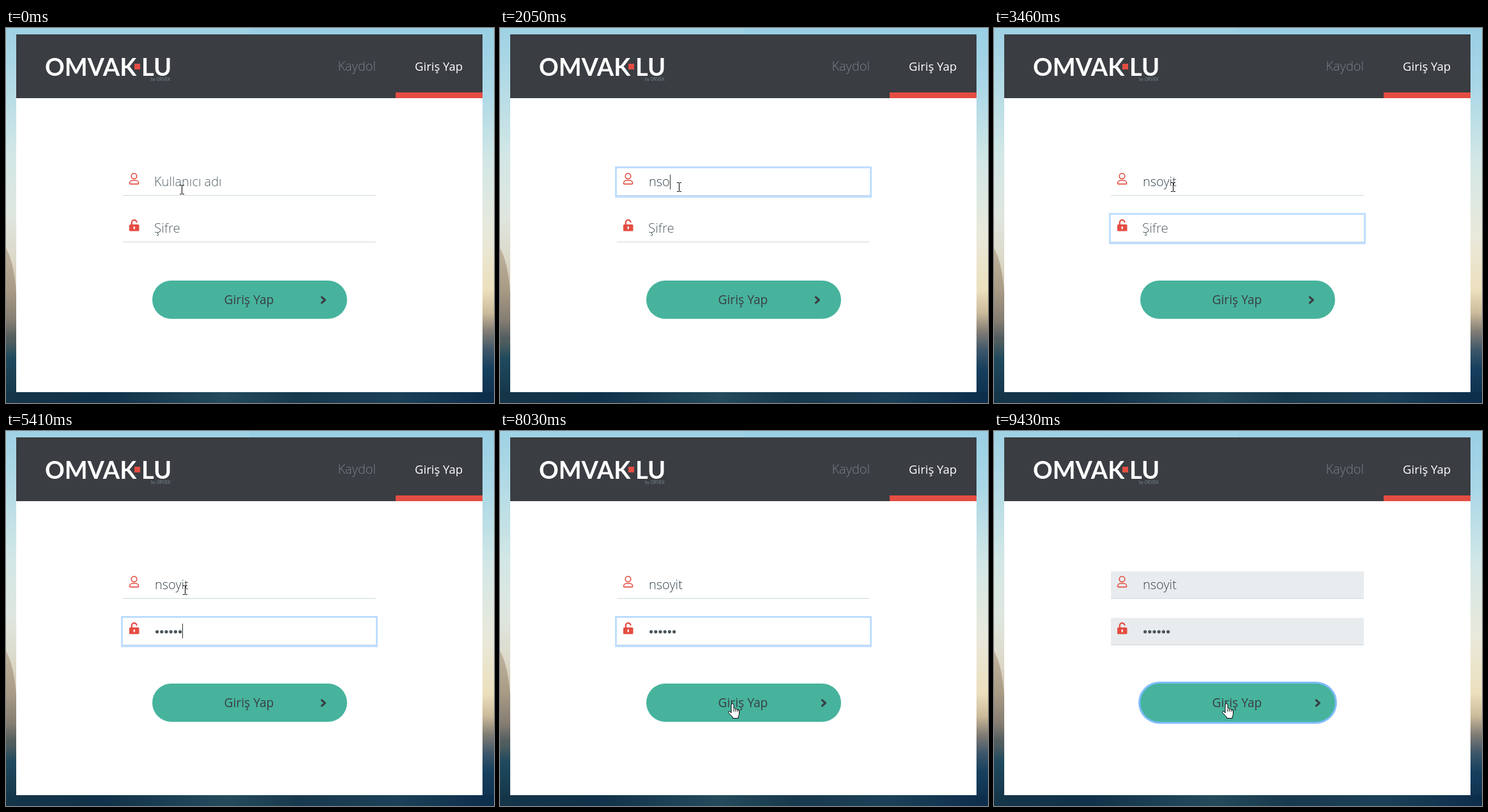
These frames come from a looping animation (764 by 588 pixels, 9510 ms). An HTML page with a canvas:

```html
<!DOCTYPE html>
<html lang="tr">
<head>
<meta charset="utf-8">
<style>
  html, body { margin: 0; width: 100%; height: 100%; overflow: hidden; }
  canvas { display: block; width: 764px; height: 588px; }
</style>
</head>
<body>
<canvas id="stage" width="764" height="588"></canvas>
<script>
const ctx = document.getElementById('stage').getContext('2d');
const LOOP = 9510;
const INK = '#3a3d42', RED = '#e44d42', TEAL = '#47b39d';
const SANS = '"Open Sans", "Noto Sans", sans-serif';
const USER = 'nsoyit';
const FIELD = { x: 183, w: 396, h: 43, textX: 233 };
const userTop = 220, passTop = 293;

const clamp = v => Math.max(0, Math.min(1, v));
const smooth = v => { v = clamp(v); return v * v * (3 - 2 * v); };
const countPassed = (times, t) => times.filter(time => t >= time).length;

// Value of the last [time, value] pair already reached.
function at(t, steps) {
  let value = steps[0][1];
  for (const [time, v] of steps) if (t >= time) value = v;
  return value;
}

function rect(x, y, w, h, fill) {
  ctx.fillStyle = fill;
  ctx.fillRect(x, y, w, h);
}

function pill(x, y, w, h, r, fill) {
  ctx.beginPath();
  ctx.roundRect(x, y, w, h, r);
  ctx.fillStyle = fill;
  ctx.fill();
}

function disc(x, y, r, fill) {
  ctx.beginPath();
  ctx.arc(x, y, r, 0, Math.PI * 2);
  ctx.fillStyle = fill;
  ctx.fill();
}

function text(str, x, y, size, weight, fill, family = SANS) {
  ctx.font = `${weight} ${size}px ${family}`;
  ctx.fillStyle = fill;
  ctx.fillText(str, x, y);
  return ctx.measureText(str).width;
}

function gradient(x1, y1, stops) {
  const g = ctx.createLinearGradient(0, 0, x1, y1);
  for (const [pos, color] of stops) g.addColorStop(pos, color);
  return g;
}

function drawBackdrop() {
  rect(0, 0, 382, 588, gradient(0, 588, [
    [0, '#9ed1e4'], [.15, '#b3dbe6'], [.34, '#d2e7e6'], [.5, '#dfe6df'],
    [.62, '#dcd8c8'], [.71, '#c9bda6'], [.78, '#978d7f'], [.83, '#56605f'],
    [.88, '#204a5e'], [1, '#123246']]));
  ctx.beginPath();
  ctx.moveTo(0, 345);
  ctx.quadraticCurveTo(12, 365, 16, 415);
  ctx.lineTo(16, 490);
  ctx.lineTo(0, 490);
  ctx.fillStyle = gradient(0, 588, [
    [.58, '#c2b59f'], [.7, '#a89a85'], [.78, '#857d72'], [.83, '#4f5b5d']]);
  ctx.fill();
  rect(382, 0, 382, 588, gradient(0, 588, [
    [0, '#99cfe4'], [.15, '#a9d7e7'], [.36, '#d3e7e6'], [.55, '#e9e9db'],
    [.7, '#ecdfbd'], [.76, '#cbbb9b'], [.81, '#807b74'], [.86, '#3c566a'],
    [.91, '#163f5e'], [1, '#0c2d4b']]));
  rect(0, 571, 764, 17, gradient(764, 0, [
    [0, '#153549'], [.2, '#10324a'], [.45, '#254a5c'], [.6, '#17394d'],
    [.8, '#1c4058'], [1, '#0c2d4b']]));
}

function drawHeader() {
  rect(16, 10, 730, 100, INK);
  text('OMVAK', 61, 75, 38, 700, '#fff', 'Lato, sans-serif');
  rect(201, 56, 9, 9, RED);
  text('LU', 212, 75, 38, 700, '#fff', 'Lato, sans-serif');
  text('by ORVEK', 227, 83, 6.5, 700, '#66757b', 'Lato, sans-serif');
  text('Kaydol', 519.5, 67, 20, 300, '#76828a');
  text('Giriş Yap', 640, 67, 18.5, 400, '#fff');
  rect(610, 101, 136, 9, RED);
}

function drawUserIcon() {
  ctx.strokeStyle = RED;
  ctx.lineWidth = 1.6;
  ctx.beginPath();
  ctx.arc(200.5, 232.3, 4.3, 0, Math.PI * 2);
  ctx.stroke();
  ctx.beginPath();
  ctx.roundRect(193.6, 239, 14, 5.6, [4.5, 4.5, 1.2, 1.2]);
  ctx.stroke();
}

function drawLockIcon() {
  pill(193, 308, 15.5, 10.5, 1.6, RED);
  ctx.strokeStyle = RED;
  ctx.lineWidth = 2.3;
  ctx.beginPath();
  ctx.moveTo(196.8, 309);
  ctx.lineTo(196.8, 305);
  ctx.arc(200.7, 305, 3.9, Math.PI, Math.PI * 2);
  ctx.stroke();
  pill(199.6, 311, 2.2, 4.6, 1, '#fff');
}

function drawField(top, focus, disabled) {
  const { x, w, h } = FIELD;
  if (focus) {
    const s = 3 * focus;
    rect(x - s, top - s, w + 2 * s, h + 2 * s, `rgba(0,123,255,${.25 * focus})`);
  }
  rect(x, top, w, h, disabled ? '#e9ecef' : '#fff');
  rect(x, top + h - 1, w, 1, focus ? '#c3d6e8' : '#ced9e1');
}

function drawCaret(x, top) {
  rect(Math.round(x), top, 1, 23, '#333');
}

function drawButton(focus, chevronShift) {
  if (focus) {
    const s = 3 * focus;
    pill(229 - s, 396 - s, 305 + 2 * s, 60 + 2 * s, 30 + s, `rgba(0,123,255,${.5 * focus})`);
  }
  pill(229, 396, 305, 60, 30, TEAL);
  text('Giriş Yap', 341.5, 433, 19.2, 400, INK);
  ctx.strokeStyle = INK;
  ctx.lineWidth = 3;
  ctx.lineCap = ctx.lineJoin = 'round';
  ctx.beginPath();
  ctx.moveTo(494.3 + chevronShift, 422);
  ctx.lineTo(499.5 + chevronShift, 426.5);
  ctx.lineTo(494.3 + chevronShift, 431);
  ctx.stroke();
  ctx.lineCap = 'butt';
  ctx.lineJoin = 'miter';
}

function drawIBeam(x, y) {
  rect(x, y - 6, 1, 13, '#000');
  for (const end of [y - 7, y + 7]) {
    rect(x - 3, end, 3, 1, '#000');
    rect(x + 1, end, 3, 1, '#000');
  }
}

function outlined(x, y, path) {
  ctx.save();
  ctx.translate(x, y);
  const shape = new Path2D(path);
  ctx.fillStyle = '#fff';
  ctx.fill(shape);
  ctx.strokeStyle = '#000';
  ctx.lineWidth = 1;
  ctx.lineJoin = 'round';
  ctx.stroke(shape);
  ctx.restore();
}

function drawArrow(x, y) {
  outlined(x, y, 'M0 0V16L4 12.5L6.5 18.5L9 17.5L6.5 11.5H11.5Z');
}

function drawHand(x, y) {
  outlined(x, y, 'M-1 1.5Q-1-.5 1-.5Q3-.5 3 1.5V7Q5 6 6 8Q8 7 9 9Q11.5 8.5 11.5 11V15' +
    'Q11.5 18 10 20V22.5H1.5V21L-4.5 14.5Q-6.5 11.5-4 11.5Q-2.5 11.5-1 14Z');
  for (const dx of [3, 6, 9]) rect(x + dx - .5, y + 8, 1, 4, '#000');
}

function drawPointer(t, moveStep) {
  if (moveStep === 0) {
    const [x, y] = at(t, [[0, [275, 253]], [260, [278, 251]], [340, [280, 249]]]);
    drawIBeam(x, y);
    return;
  }
  const p = smooth(moveStep / 6);
  const x = Math.round(280 + 83 * p), y = Math.round(249 + 179 * p);
  const overField = y < userTop + FIELD.h || (y >= passTop && y < passTop + FIELD.h);
  if (y >= 396) drawHand(x, y);
  else if (overField) drawIBeam(x, y);
  else drawArrow(x, y);
}

function drawUserField(t, disabled) {
  const focus = at(t, [[0, 0], [720, .35], [800, .85], [890, 1], [2900, .87], [2990, .35], [3060, 0]]);
  drawField(userTop, focus, disabled);
  drawUserIcon();
  const typed = USER.slice(0, at(t, [[0, 0], [1970, 1], [2050, 3], [2200, 4], [2520, 5], [2670, 6]]));
  const width = typed
    ? text(typed, FIELD.textX, 248, 20, 300, '#35444e')
    : (text('Kullanıcı adı', FIELD.textX - 1, 248, 20, 300, '#55636a'), 0);
  const caretOn = at(t, [[0, false], [720, true], [1270, false], [1820, true], [2900, false]]);
  if (caretOn) drawCaret(FIELD.textX + width, 230);
}

function drawPassField(t, disabled) {
  const focus = at(t, [[0, 0], [2990, .65], [3060, 1], [9270, .65], [9350, .2], [9430, 0]]);
  drawField(passTop, focus, disabled);
  drawLockIcon();
  const typed = countPassed([3990, 4160, 4390, 4710, 5090, 5410], t);
  if (!typed) text('Şifre', FIELD.textX - 1, 321, 20.5, 300, '#55636a');
  for (let i = 0; i < typed; i++) disc(236.6 + 7.2 * i, 314.8, 2.6, '#4a555b');
  const blinks = countPassed([2900, 3460, 3990, 5950, 6490, 6950, 7500, 8030, 8580, 9040], t);
  if (blinks % 2) drawCaret(FIELD.textX + 7.2 * typed, 302);
}

function draw(t) {
  const moveStep = t < 5870 ? 0 : Math.min(9, Math.floor((t - 5870) / 77.5) + 1);
  const disabled = t >= 9350;

  drawBackdrop();
  rect(16, 10, 730, 561, '#fff');
  drawHeader();
  drawUserField(t, disabled);
  drawPassField(t, disabled);
  drawButton(at(t, [[0, 0], [9350, .6], [9430, 1]]), 10 * smooth((moveStep - 5) / 4));

  const click = 'rgba(222,226,0,.62)';
  if (t >= 720 && t < 890) disc(280, 249, 12.5, click);
  if (t >= 9270 && t < 9430) disc(363, 428, 12.5, click);
  drawPointer(t, moveStep);
}

const start = performance.now();
function tick() {
  draw((performance.now() - start) % LOOP);
  requestAnimationFrame(tick);
}
tick();
</script>
</body>
</html>
```
